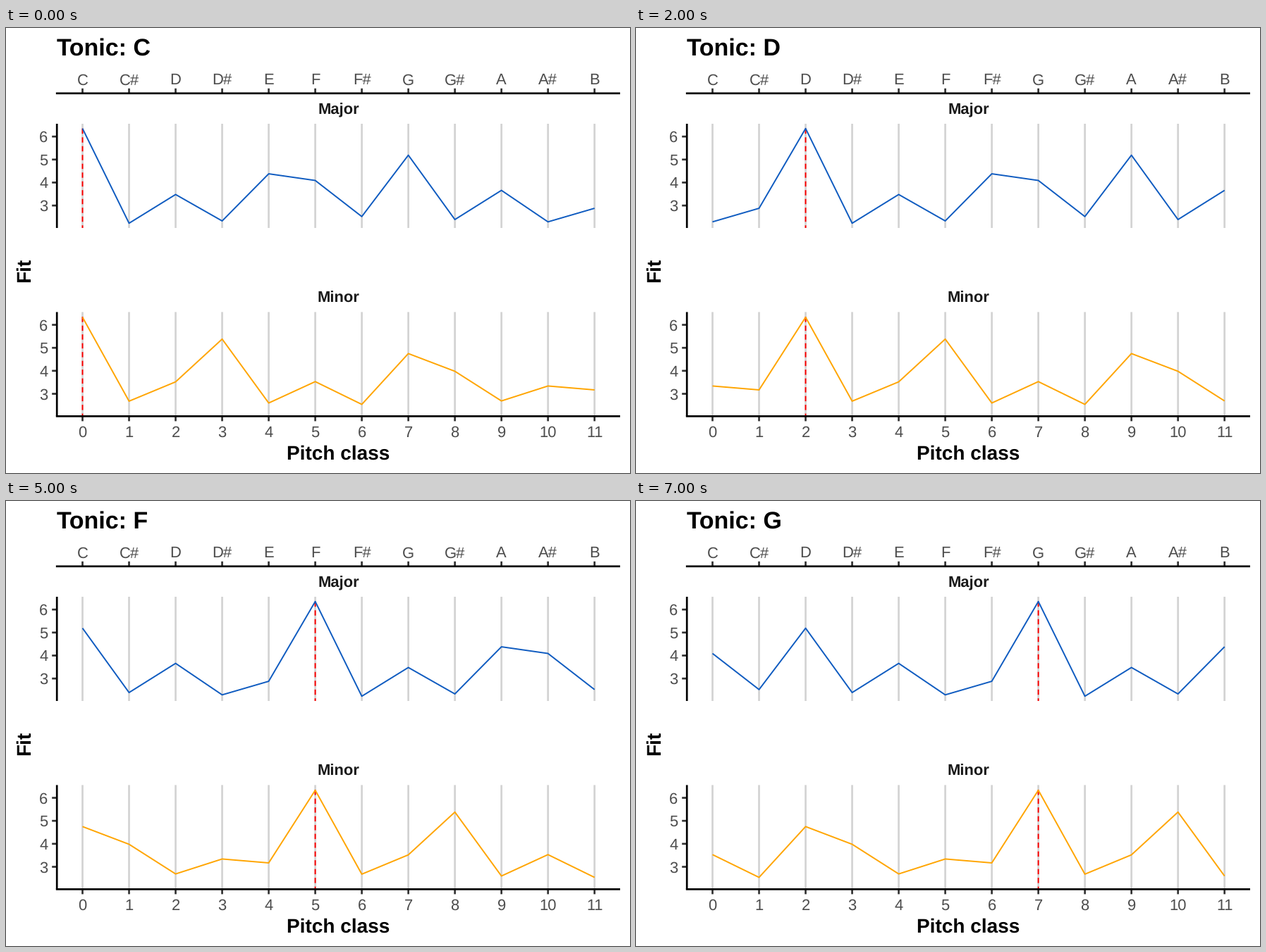
A matplotlib script that plays this animation: 885x632 px, repeating every 8 s.

```python
import matplotlib.pyplot as plt
import numpy as np
from matplotlib.animation import FuncAnimation

W, H, DPI = 885, 632, 64
PT = 72 / DPI  # points per pixel

NOTES = ["C", "C#", "D", "D#", "E", "F", "F#", "G", "G#", "A", "A#", "B"]
MAJOR = [6.35, 2.23, 3.48, 2.33, 4.38, 4.09, 2.52, 5.19, 2.39, 3.66, 2.29, 2.88]
MINOR = [6.33, 2.68, 3.52, 5.38, 2.60, 3.53, 2.54, 4.75, 3.98, 2.69, 3.34, 3.17]

LEFT, RIGHT = 72.2, 871
PANEL_H = 148
STEP = (RIGHT - LEFT) / 12.1
X = LEFT + STEP * (np.arange(12) + 0.55)
Y_MIN, Y_MAX = 2.024, 6.556
PEAK = max(MAJOR)

INK, TICK, LABEL, GRID = "black", "#333333", "#4d4d4d", "#d3d3d3"
THICK, THIN = 2.7, 1.95

plt.rcParams["font.family"] = "Liberation Sans"
plt.rcParams["text.hinting"] = "none"
plt.rcParams["text.hinting_factor"] = 1
plt.rcParams["lines.scale_dashes"] = False

fig = plt.figure(figsize=(W / DPI, H / DPI), dpi=DPI, facecolor="white")
ax = fig.add_axes([0, 0, 1, 1])
ax.set_xlim(0, W)
ax.set_ylim(H, 0)
ax.axis("off")


def line(xs, ys, color, width=THICK, z=1, **kw):
    return ax.plot(xs, ys, color=color, lw=width * PT, zorder=z, snap=False,
                   solid_capstyle="butt", dash_capstyle="butt",
                   solid_joinstyle="round", **kw)[0]


def text(x, y, s, size=22.4, color=LABEL, ha="center", **kw):
    return ax.text(x, y, s, fontsize=size * PT, color=color, ha=ha,
                   va="baseline", **kw)


def to_y(value, bottom):
    return bottom - (np.asarray(value) - Y_MIN) / (Y_MAX - Y_MIN) * PANEL_H


def make_panel(name, bottom, color):
    top = bottom - PANEL_H
    for x in X:
        line([x, x], [top, bottom], GRID)
    line([LEFT, LEFT], [top, bottom], INK, z=5)
    for v in range(3, 7):
        y = to_y(v, bottom)
        line([LEFT - 7, LEFT], [y, y], TICK, z=4)
        text(59.5, y + 8, str(v), ha="right")
    text((LEFT + RIGHT) / 2, top - 13.3, name, color="#1a1a1a", weight="bold")
    marker = line([], [], "red", THIN, z=2,
                  linestyle=(0, (7.5 * PT, 5 * PT)))
    curve = line([], [], color, THIN, z=3)
    return marker, curve


def x_axis(y, tick_dir, labels, baseline):
    line([LEFT - THICK / 2, RIGHT], [y, y], INK, z=5)
    for x, s in zip(X, labels):
        line([x, x], [y, y + 7 * tick_dir], TICK, z=4)
        text(x, baseline, s)


panels = [(make_panel("Major", 284, "#0f5bc0"), MAJOR, 284),
          (make_panel("Minor", 551.4, "#ffa500"), MINOR, 551.4)]
x_axis(92.8, -1, NOTES, 80.5)
x_axis(551.4, 1, range(12), 581)

title = text(LEFT, 38.2, "", 33.6, INK, "left", weight="bold")
text((LEFT + RIGHT) / 2, 612.5, "Pitch class", 28, INK, weight="bold")
ax.text(34, 343.8, "Fit", fontsize=28 * PT, color=INK, weight="bold",
        rotation=90, rotation_mode="anchor", ha="center", va="baseline")


def draw(tonic):
    title.set_text(f"Tonic: {NOTES[tonic]}")
    for (marker, curve), profile, bottom in panels:
        curve.set_data(X, to_y(np.roll(profile, tonic), bottom))
        marker.set_data([X[tonic]] * 2, [to_y(PEAK, bottom), bottom])
    return []


anim = FuncAnimation(fig, draw, frames=8, interval=1000, repeat=True,
                     repeat_delay=0, init_func=lambda: draw(0))
plt.show()
```
